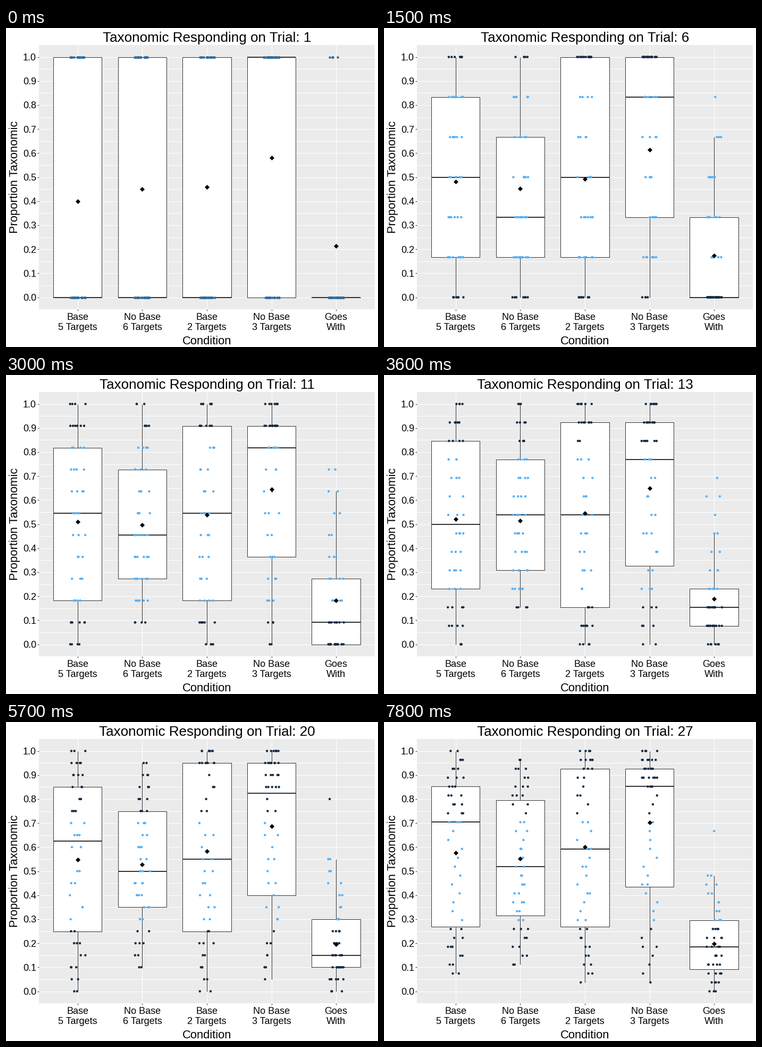
Write a matplotlib script that moves like this. It is 700x600 px and loops after 8000 ms.

```python
from math import comb

import matplotlib.pyplot as plt
import numpy as np
from matplotlib.animation import FuncAnimation
from matplotlib.patches import Rectangle

plt.rcParams["font.family"] = "Liberation Sans"

WIDTH, HEIGHT, DPI = 700, 600, 100
PX = 72 / DPI  # points per pixel
STEP_MS, STEPS_PER_TRIAL, STEPS = 100, 3, 80

LEFT, RIGHT, TOP, BOTTOM = 62, 694, 32, 529
UNIT = (RIGHT - LEFT) / 5.2
HALF_BOX = 0.375 * UNIT
JITTER = 0.122 * UNIT
INK, DARK, LIGHT, MIDDLE = "#333333", "#132B43", "#56B1F7", "#336A98"

# Trials at which the response counts below are known
TRIALS = np.array([1, 4, 9, 13, 16, 20, 27])


class Condition:
    """Spread of response counts over the trials for one group of people."""

    def __init__(self, label, people, q1, median, q3, mean,
                 low=0, high=TRIALS, peak=None, strays=0):
        peak = high if peak is None else peak
        self.label, self.people, self.mean = label, people, mean
        self.shares = [np.broadcast_to(c, 7) / TRIALS
                       for c in (low, q1, median, q3, high, peak)]
        self.strays = np.broadcast_to(strays, 7)

    def at(self, trial):
        """Five box counts, one sorted count per person, and the mean share."""
        counts = np.array([np.interp(trial, TRIALS, s) * trial
                           for s in self.shares])
        if trial not in TRIALS:
            counts = np.round(counts)
        box, peak = counts[:5], counts[5]
        strays = int(round(np.interp(trial, TRIALS, self.strays)))
        rank = np.linspace(0, 1, self.people)
        end = 1 - max(strays, 0.001) / self.people
        dots = np.interp(rank, [0, 0.25, 0.5, min(0.75, end - 0.01), end], box)
        if strays:
            dots[-strays:] = np.linspace(box[4], peak, strays + 1)[1:]
        return box, np.round(dots).astype(int), np.interp(trial, TRIALS, self.mean)


base_five = Condition(
    "Base\n5 Targets", 50,
    q1=[0, 1, 2, 3, 4, 5, 7.25],
    median=[0, 2, 5, 6.5, 9, 12.5, 19],
    q3=[1, 3, 7, 11, 14, 17, 23],
    mean=[.4, .469, .5, .521, .536, .547, .577],
    low=[0, 0, 0, 0, 0, 0, 2])
no_base_six = Condition(
    "No Base\n6 Targets", 51,
    q1=[0, .5, 2, 4, 5, 7, 8.5],
    median=[0, 1, 4, 7, 8, 10, 14],
    q3=[1, 3, 6.5, 10, 11.5, 15, 21.5],
    mean=[.451, .435, .477, .515, .515, .528, .551],
    low=[0, 0, 0, 2, 2, 2, 3], high=[1, 4, 9, 13, 15, 19, 26])
base_two = Condition(
    "Base\n2 Targets", 50,
    q1=[0, 0, 2, 2, 3.25, 5, 7.25],
    median=[0, 2, 5, 7, 9, 11, 16],
    q3=[1, 4, 8, 12, 15, 19, 25],
    mean=[.46, .465, .533, .546, .573, .582, .601],
    low=[0, 0, 0, 0, 0, 0, 1])
no_base_three = Condition(
    "No Base\n3 Targets", 50,
    q1=[0, 1, 4, 4.25, 6, 8, 11.75],
    median=[1, 3, 7, 10, 13, 16.5, 23],
    q3=[1, 4, 8, 12, 15, 19, 25],
    mean=[.58, .594, .642, .649, .664, .686, .702],
    low=[0, 0, 0, 0, 0, 1, 1])
goes_with = Condition(
    "Goes\nWith", 47,
    q1=[0, 0, 0, 1, 1, 2, 2.5],
    median=[0, 0, 1, 2, 2, 3, 5],
    q3=[0, 1, 3, 3, 4, 6, 8],
    mean=[.213, .17, .177, .189, .189, .195, .199],
    high=[0, 2, 7, 6, 8, 11, 13], peak=[1, 3, 7, 9, 12, 16, 18],
    strays=[10, 1, 0, 4, 2, 1, 1])
CONDITIONS = [base_five, no_base_six, base_two, no_base_three, goes_with]


def x_of(index):
    return LEFT + (0.6 + index) * UNIT


def y_of(share):
    return 506.5 - 452 * np.asarray(share)


def beats_chance(count, trials):
    """Two-sided binomial test against one half."""
    tail = sum(comb(trials, k) for k in range(min(count, trials - count) + 1))
    return 2 * tail / 2 ** trials < 0.05


fig = plt.figure(figsize=(WIDTH / DPI, HEIGHT / DPI), dpi=DPI, facecolor="white")
ax = fig.add_axes([0, 0, 1, 1])
ax.set(xlim=(0, WIDTH), ylim=(HEIGHT, 0))
ax.axis("off")


def line(xs, ys, color=INK, width=1, z=1):
    return ax.plot(xs, ys, color=color, lw=width * PX, zorder=z,
                   solid_capstyle="butt")[0]


def write(x, y, text, size, **style):
    style = {"ha": "center", "va": "baseline", "color": "black", **style}
    return ax.text(x, y, text, fontsize=size * PX, **style)


def draw_background():
    ax.add_patch(Rectangle((LEFT, TOP), RIGHT - LEFT, BOTTOM - TOP,
                           fc="#EBEBEB", ec="none", zorder=0))
    for i in range(21):
        y = y_of(i / 20)
        line([LEFT, RIGHT], [y, y], "white")
        if i % 2 == 0:
            line([LEFT - 3, LEFT], [y, y])
            write(57, y + 6.5, f"{i / 20:.1f}", 18, ha="right")
    for i, condition in enumerate(CONDITIONS):
        x = x_of(i)
        line([x, x], [TOP, BOTTOM], "white")
        line([x, x], [BOTTOM, BOTTOM + 3])
        for row, text in enumerate(condition.label.split("\n")):
            write(x, 549 + 19 * row, text, 18)
    write(378, 595, "Condition", 22)
    write(22, 280, "Proportion Taxonomic", 22, rotation=90,
          rotation_mode="anchor")


def draw_box(x, box):
    low, q1, median, q3, high = y_of(box)
    left, right = x - HALF_BOX, x + HALF_BOX
    frame = Rectangle((left, q3), right - left, q1 - q3, fc="white", ec=INK,
                      lw=PX, zorder=3)
    return [line([x, x], [low, q1], z=2), line([x, x], [q3, high], z=2),
            ax.add_patch(frame),
            line([left, right], [median, median], width=2, z=4)]


draw_background()
title = write(378, 26, "", 26)
drawn = []


def update(step):
    trial = step // STEPS_PER_TRIAL + 1
    rng = np.random.default_rng(trial)
    while drawn:
        drawn.pop().remove()
    title.set_text(f"Taxonomic Responding on Trial: {trial}")

    xs, counts = [], []
    for i, condition in enumerate(CONDITIONS):
        box, dots, mean = condition.at(trial)
        drawn.extend(draw_box(x_of(i), box / trial))
        xs.extend(x_of(i) + rng.uniform(-JITTER, JITTER, len(dots)))
        counts.extend(int(c) for c in dots)
        drawn.append(ax.scatter(x_of(i), y_of(mean), marker="D", color="black",
                                s=(6.4 * PX) ** 2, lw=0, zorder=6))

    if beats_chance(0, trial):
        colors = [DARK if beats_chance(c, trial) else LIGHT for c in counts]
    else:
        colors = MIDDLE
    drawn.append(ax.scatter(xs, y_of(np.array(counts) / trial), c=colors,
                            s=(4.4 * PX) ** 2, lw=0, zorder=5))
    return [title, *drawn]


animation = FuncAnimation(fig, update, frames=STEPS, interval=STEP_MS,
                          repeat=True, repeat_delay=0, blit=False)
plt.show()
```
